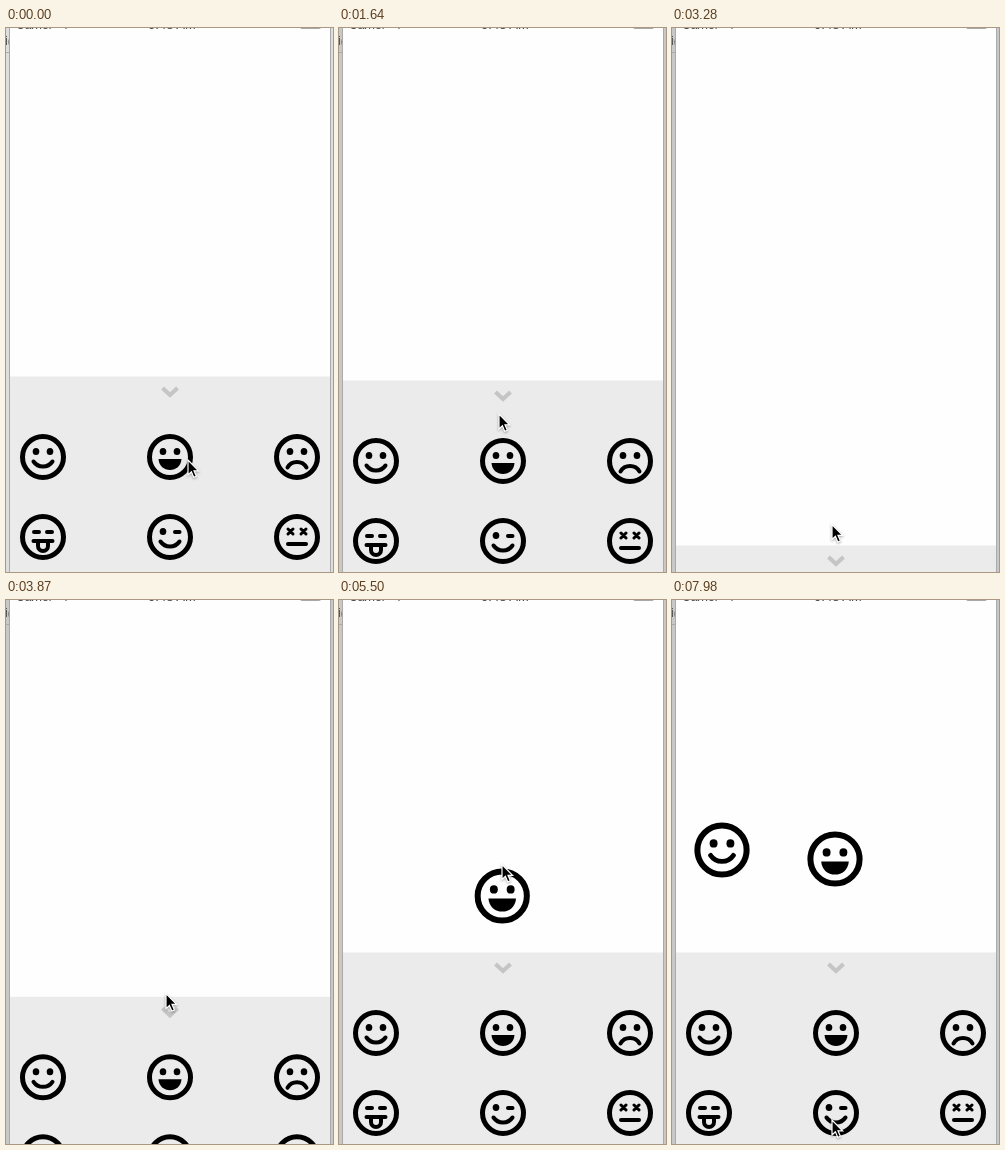
Recreate the animation shown at these times as an HTML page. Size 327 px wide and 544 px high, loop 8 s.

```html
<!DOCTYPE html>
<html lang="en">
<head>
<meta charset="utf-8">
<title>Emoji tray</title>
<style>
html, body { margin: 0; width: 100%; height: 100%; overflow: hidden; background: #fff; }
svg { display: block; width: 327px; height: 544px; }
text { font-family: "Liberation Sans", Arial, sans-serif; font-size: 12px; fill: #444; }
.line { fill: none; stroke: #000; stroke-width: 4; stroke-linecap: round; stroke-linejoin: round; }
</style>
</head>
<body>
<svg viewBox="0 0 327 544">
  <defs>
    <circle id="ring" r="20.5" fill="none" stroke="#000" stroke-width="5"/>
    <ellipse id="eye" rx="3.3" ry="3.5"/>
    <g id="eyes"><use href="#eye" x="-7" y="-5.5"/><use href="#eye" x="7" y="-5.5"/></g>
    <path id="curve" class="line" d="M-9.5 4.5A11.5 11.5 0 0 0 9.5 4.5"/>
    <g id="smile"><use href="#ring"/><use href="#eyes"/><use href="#curve"/></g>
    <g id="grin"><use href="#ring"/><use href="#eyes"/><path d="M-11.5 2H11.5C11 9 6 13 0 13S-11 9-11.5 2Z"/></g>
    <g id="sad"><use href="#ring"/><use href="#eyes"/><path class="line" d="M-9.5 10.5A11 11 0 0 1 9.5 10.5"/></g>
    <g id="tongue"><use href="#ring"/>
      <path class="line" d="M-9-5H-4M4-5H9M-9.5 4H9.5"/>
      <path d="M-7 4H7V9A7 7 0 0 1-7 9Z"/>
      <path d="M-3 6H3V9A3 3 0 0 1-3 9Z" fill="#ebebeb"/></g>
    <g id="wink"><use href="#ring"/><use href="#eye" x="-7" y="-5.5"/>
      <path class="line" d="M5-5H9.5"/><use href="#curve"/></g>
    <g id="dead"><use href="#ring"/>
      <path class="line" style="stroke-width:3" d="M-9-8l5 5m0-5l-5 5M4-8l5 5m0-5l-5 5"/>
      <path class="line" d="M-9 7H9"/></g>
  </defs>

  <rect id="desk" width="327" height="544"/>
  <path d="M0 24.5H4" stroke="#aaa"/>
  <text x="-1" y="17">i(</text>
  <rect x="3" width="322" height="544" fill="#aaa"/>
  <rect x="4" width="320" height="544" fill="#fefefe"/>
  <text x="10" y=".8">Carrier</text>
  <circle cx="60" cy="-.4" r="1.1" fill="#444"/>
  <text x="166" y=".8" text-anchor="middle" style="font-size:13px">9:48 AM</text>
  <rect x="293.5" y="-8" width="22" height="8" rx="2" fill="#333" stroke="#555"/>

  <g id="tray">
    <rect x="4" width="320" height="204" fill="#ebebeb"/>
    <path d="M156.5 11.5L164 18.5L171.5 11.5" fill="none" stroke="#c5c5c5" stroke-width="4.2"/>
    <use href="#smile" x="37" y="80.5"/><use href="#grin" x="164" y="80.5"/><use href="#sad" x="291" y="80.5"/>
    <use href="#tongue" x="37" y="160.5"/><use href="#wink" x="164" y="160.5"/><use href="#dead" x="291" y="160.5"/>
  </g>
  <use id="grinCopy" href="#grin"/>
  <use id="smileCopy" href="#smile"/>
  <path id="cursor" d="M0 0V15L3.4 11.8L5.8 17.4L8.4 16.3L6 10.8H10.6Z" stroke="#fff" stroke-width="1.2"
    style="filter:drop-shadow(0 1px 1px #0005)"/>
</svg>
<script>
const LOOP = 8000, STEP = 117.2;   // the picture moves in steps of about 117 ms
const OPEN = 352.5, CLOSED = 517.5;

// A move is [first step, last step, x, y] and ends at x, y
const trayMoves = [[0, 2, 0, OPEN], [5, 9.2, 0, 261.5], [9.2, 12, 0, OPEN],
  [14, 19, 0, CLOSED], [31, 35.15, 0, OPEN]];
const cursorMoves = [[0, 4, 204, 373], [5, 9.2, 204, 280], [9.2, 14, 160, 386],   // lift the tray
  [14, 19, 150, 525], [20, 25, 160, 466], [27, 30, 160, 521], [31, 34.5, 160, 365], // close, open
  [45, 49, 164, 231], [51, 57, 28, 427], [57, 61, 40, 236], [62, 68, 160, 520]];   // drag faces

const easeOut = p => 1 - (1 - p) ** 2;

function travel(pos, moves, n) {
  for (const [first, last, ...end] of moves) {
    const p = easeOut(Math.min(1, Math.max(0, (n - first) / (last - first))));
    pos = pos.map((v, i) => v + (end[i] - v) * p);
  }
  return pos;
}

function cursorAt(n) {
  if (n <= 38 || n > 45) return travel([182, 432], cursorMoves, n);
  const turn = (n - 38) / 7 * 2 * Math.PI;   // one round over the six faces
  return [160 - 139 * Math.sin(turn), 445 - 72 * Math.cos(turn)];
}

const el = id => document.getElementById(id);
const place = (id, [x, y], scale = 1) =>
  el(id).setAttribute("transform", `translate(${x} ${y}) scale(${scale})`);

function drag(id, from, move, n) {
  el(id).style.display = n < move[0] ? "none" : "";
  place(id, travel(from, [move], n), 1.2);
}

function draw(time) {
  const n = Math.floor((time % LOOP + 10) / STEP);
  el("desk").setAttribute("fill", n < 1 ? "#dedede" : "#c8c8c8");
  place("tray", travel([0, 348.5], trayMoves, n));
  place("cursor", cursorAt(n));
  drag("grinCopy", [164, 407], [45, 49, 163, 259], n);
  drag("smileCopy", [37, 372], [58, 61, 50, 250], n);
}

const start = performance.now();
function tick() {
  draw(performance.now() - start);
  requestAnimationFrame(tick);
}
tick();
</script>
</body>
</html>
```
